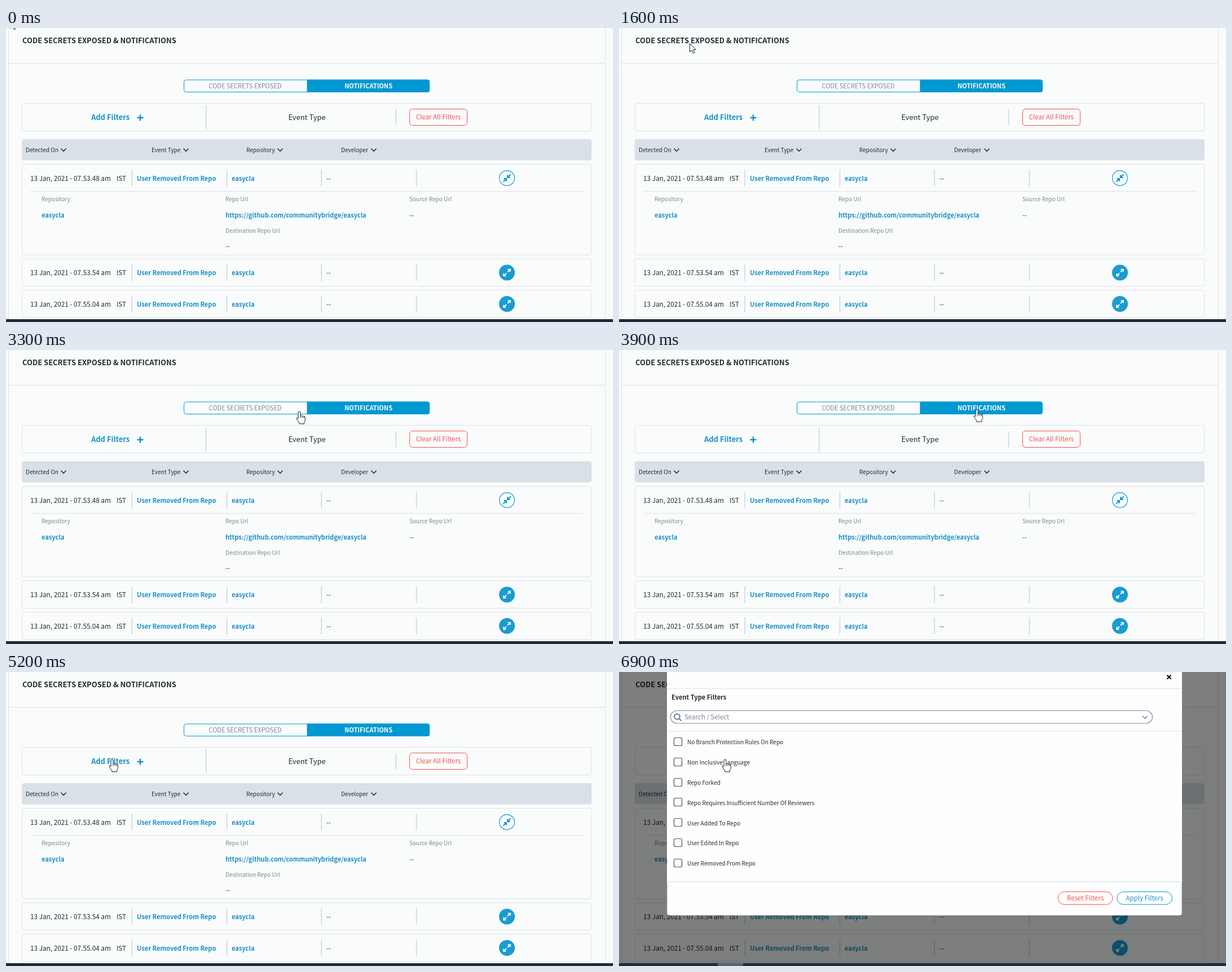
An HTML page for the animation above (8000 ms loop, 1076 px wide and 521 px high).

```html
<!DOCTYPE html>
<html lang="en">
<head>
<meta charset="utf-8">
<title>Notifications</title>
<style>
html, body { margin: 0; width: 100%; height: 100%; overflow: hidden; background: #fafcfc; }
svg { display: block; width: 1076px; height: 521px; }
text { font-family: "Noto Sans CJK JP", "Noto Sans CJK SC", "Open Sans", sans-serif; font-size: 11.5px; fill: #222b33; white-space: pre; }
.mid { text-anchor: middle; }
.big { font-size: 12.95px; }
.tab { font-size: 11.05px; }
.small { font-size: 10.05px; }
.bold { font-weight: 700; font-size: 11.1px; }
.title { font-weight: 700; font-size: 12.95px; }
.date { font-size: 11.75px; }
.link { fill: #1a8fc4; }
.mute { fill: #7b8794; }
.red { fill: #f5504e; }
.line { fill: none; stroke: #dde1e7; }
.bar { stroke: #cfd6e1; stroke-width: 1.6; }
.chev { fill: none; stroke: #1e2f40; stroke-width: 1.6; }
.cursor { fill: #fff; stroke: #111a2a; stroke-linejoin: round; }

#cursor, #arrow, #hand, #modal, #task { animation: 8s step-end -5ms infinite both; }
#cursor { animation-name: move; }
#arrow { animation-name: arrow; }
#hand { animation-name: hand; }
#modal { animation-name: modal; }
#task { animation-name: task; }

/* The pointer is sampled every 100 ms: one step per sample. */
@keyframes move {
  0% { transform: translate(8px, -15px); }
  5% { transform: translate(8px, -15px); animation-timing-function: steps(6); }
  12.5% { transform: translate(35px, 25px); }
  15% { transform: translate(35px, 25px); animation-timing-function: steps(4); }
  20% { transform: translate(125px, 27px); }
  21.25% { transform: translate(125px, 27px); animation-timing-function: steps(3); }
  25% { transform: translate(195px, 26px); }
  26.25% { transform: translate(195px, 26px); animation-timing-function: steps(2); }
  28.75% { transform: translate(236px, 24px); animation-timing-function: steps(3); }
  32.5% { transform: translate(300px, 24px); }
  35% { transform: translate(330px, 40px); }
  37.5% { transform: translate(330px, 40px); animation-timing-function: steps(3); }
  41.25% { transform: translate(520px, 109px); }
  42.5% { transform: translate(520px, 109px); animation-timing-function: steps(7); }
  51.25% { transform: translate(680px, 104px); }
  52.5% { transform: translate(680px, 104px); animation-timing-function: steps(2); }
  55% { transform: translate(705px, 98.5px); animation-timing-function: steps(7); }
  63.75% { transform: translate(190px, 156px); }
  65%, 100% { transform: translate(188px, 155px); }
}
@keyframes arrow { 0% { opacity: 1; } 41.25% { opacity: 0; } 57.5% { opacity: 1; } 63.75%, 100% { opacity: 0; } }
@keyframes hand { 0% { opacity: 0; } 41.25% { opacity: 1; } 57.5% { opacity: 0; } 63.75%, 100% { opacity: 1; } }
@keyframes task { 0% { opacity: 0; } 83.75%, 100% { opacity: 1; } }
@keyframes modal { 0% { opacity: 0; } 86.25%, 100% { opacity: 1; } }
</style>
</head>
<body>
<svg viewBox="0 0 1076 521">
  <rect width="1076" height="521" fill="#fafcfc"/>
  <g id="page"></g>
  <rect y="516" width="1076" height="5" fill="#1d2b3a"/>
  <rect id="task" x="175" y="516" width="45" height="5" fill="#5b6670"/>
  <g id="modal"></g>
  <g id="cursor">
    <path id="arrow" class="cursor" d="M.5.5V15.6L4 12.3l2.5 5.5 2.3-1-2.4-5.4h4.8z"/>
    <g id="hand" class="cursor">
      <path d="M-2 12.5V2a2 2 0 0 1 4 0v6a1.8 1.8 0 0 1 3 .3 1.8 1.8 0 0 1 3 .5 1.6 1.6 0 0 1 2.2 1.4V15c0 2-1.7 3.5-1.7 5v1.8H-.2V20c-1.8-2-3.2-4.8-4.4-7-1-2 .8-3 2.6-.5z"/>
      <path d="M2 8v3.5M5 8.5v3M8 9v2.5" fill="none"/>
    </g>
  </g>
</svg>
<script>
const BLUE = '#0098d0', RED = '#f5504e';
const text = (x, y, s, cls = '') => `<text x="${x}" y="${y}" class="${cls}">${s}</text>`;
const box = (x, y, w, h, r, fill, stroke, sw = 1) =>
  `<rect x="${x}" y="${y}" width="${w}" height="${h}" rx="${r}" fill="${fill}" stroke="${stroke}" stroke-width="${sw}"/>`;
const path = (d, cls) => `<path class="${cls}" d="${d}"/>`;
const card = (y, h) => box(28.5, y, 1009.5, h, 4, 'none', '#dde1e7');
const chevron = (x, y) => path(`M${x - 4.5} ${y - 2.3}l4.5 4.6 4.5-4.6`, 'chev');

function toggle(y, open) {
  const ink = open ? BLUE : '#fff';
  const arrow = open
    ? 'M1 -1L6.5 -6.5M1 -5.5V-1H5.5'
    : 'M1 -1L5.5 -5.5M1.8 -5.8H5.8V-1.8';
  const half = turn => `<path transform="rotate(${turn})" d="${arrow}"/>`;
  return `<g transform="translate(888 ${y})">
    <circle r="13.4" fill="${open ? '#fafcfc' : '#1a9cd2'}" stroke="#1a9cd2" stroke-width="1.2"/>
    <g fill="none" stroke="${ink}" stroke-width="2">${half(0)}${half(180)}</g></g>`;
}

function row(y, time, open) {
  return text(43, y + 4.5, `13 Jan, 2021 - ${time} am`, 'date') + text(196, y + 4.5, 'IST') +
    text(232, y + 4.5, 'User Removed From Repo', 'bold link') +
    text(400, y + 4.5, 'easycla', 'bold link') + text(568, y + 4.5, '--') +
    [223, 391.5, 559.2, 727.5].map(x => path(`M${x} ${y - 15}v30`, 'bar')).join('') +
    toggle(y, open);
}

const heads = [[35, 'Detected On', 102], [258, 'Event Type', 319], [426, 'Repository', 486], [594, 'Developer', 652]];

page.innerHTML =
  path('M4.5 0V516M1062.5 0V516M4.5 62.5H1062.5', 'line') +
  text(29, 27, 'CODE SECRETS EXPOSED &amp; NOTIFICATIONS', 'title') +
  box(315.5, 92, 435, 21.5, 4, '#fafcfc', BLUE) +
  `<path d="M533.5 91.5H747a4 4 0 0 1 4 4v14.500a4 4 0 0 1-4 4H533.5z" fill="${BLUE}"/>` +
  text(424, 106.5, 'CODE SECRETS EXPOSED', 'tab mid mute') +
  `<text x="642.5" y="106.5" class="bold mid" style="fill:#fff">NOTIFICATIONS</text>` +
  card(133.5, 49) +
  text(151, 163, 'Add Filters', 'title link') +
  `<path d="M232.500 159h11M238 153.500v11" stroke="#1a8fc4" stroke-width="2.4"/>` +
  path('M354.700 137V180M691 144V172', 'bar') +
  text(533.5, 163, 'Event Type', 'big mid') +
  box(715.5, 143.5, 102, 29, 5, '#fafcfc', RED) +
  text(766.5, 162, 'Clear All Filters', 'mid red') +
  '<rect x="28" y="197" width="1010" height="37.5" rx="4" fill="#d9e0e8"/>' +
  heads.map(([x, s, cx]) => text(x, 219.5, s, 'small') + chevron(cx, 216)).join('') +
  card(241.5, 160.5) + card(409, 48.5) + card(464.5, 48.5) +
  row(266, '07.53.48', true) + row(433.5, '07.53.54') + row(489, '07.55.04') +
  path('M43 289.500H1024', 'line') +
  text(63, 307, 'Repository', 'small mute') +
  text(63, 335.5, 'easycla', 'bold link') +
  text(389, 307, 'Repo Url', 'small mute') +
  text(389, 335.5, 'https://github.com/communitybridge/easycla', 'bold link') +
  text(389, 363, 'Destination Repo Url', 'small mute') +
  text(389, 391, '--') +
  text(715, 307, 'Source Repo Url', 'small mute') +
  text(715, 335.5, '--', 'bold link');

const filters = ['No Branch Protection Rules On Repo', 'Non Inclusive Language', 'Repo Forked',
  'Repo Requires Insufficient Number Of Reviewers', 'User Added To Repo', 'User Edited In Repo',
  'User Removed From Repo'];

modal.innerHTML =
  '<rect width="1076" height="516" fill="#000" fill-opacity=".5"/>' +
  '<path d="M85 0H998V427a4 4 0 0 1-4 4H89a4 4 0 0 1-4-4z" fill="#fefefe"/>' +
  path('M85 29.500H998M85 105H998', 'line') +
  '<path d="M971.500 5.500l7 7M978.500 5.500l-7 7" stroke="#111" stroke-width="2.2"/>' +
  text(93, 49, 'Event Type Filters', 'bold') +
  box(91.5, 68.5, 854, 22.5, 11.2, '#fff', '#7a88a6', 1.2) +
  '<g fill="none" stroke="#66789a" stroke-width="2"><circle cx="103" cy="79" r="4.800"/><path d="M106.500 82.500l4 4"/></g>' +
  text(116, 84, 'Search / Select', 'mute') +
  '<path d="M928 78l4.300 4.300 4.300-4.300" fill="none" stroke="#66789a" stroke-width="1.300"/>' +
  filters.map((s, i) => {
    const y = 124 + i * 35.8;
    return box(97.5, Math.round(y) - 7.5, 14, 14, 2, '#fff', '#4a525a', 1.2) + text(121, y + 4.3, s, 'small');
  }).join('') +
  box(85.5, 371.5, 912, 59.5, 5, '#fefefe', '#cfd8e4') +
  box(778.5, 389.5, 96.5, 22.5, 11.2, '#fff', RED) +
  text(826.7, 405, 'Reset Filters', 'mid red') +
  box(883, 389.5, 97.5, 22.5, 11.2, '#fff', BLUE) +
  text(931.7, 405, 'Apply Filters', 'mid link');
</script>
</body>
</html>
```
